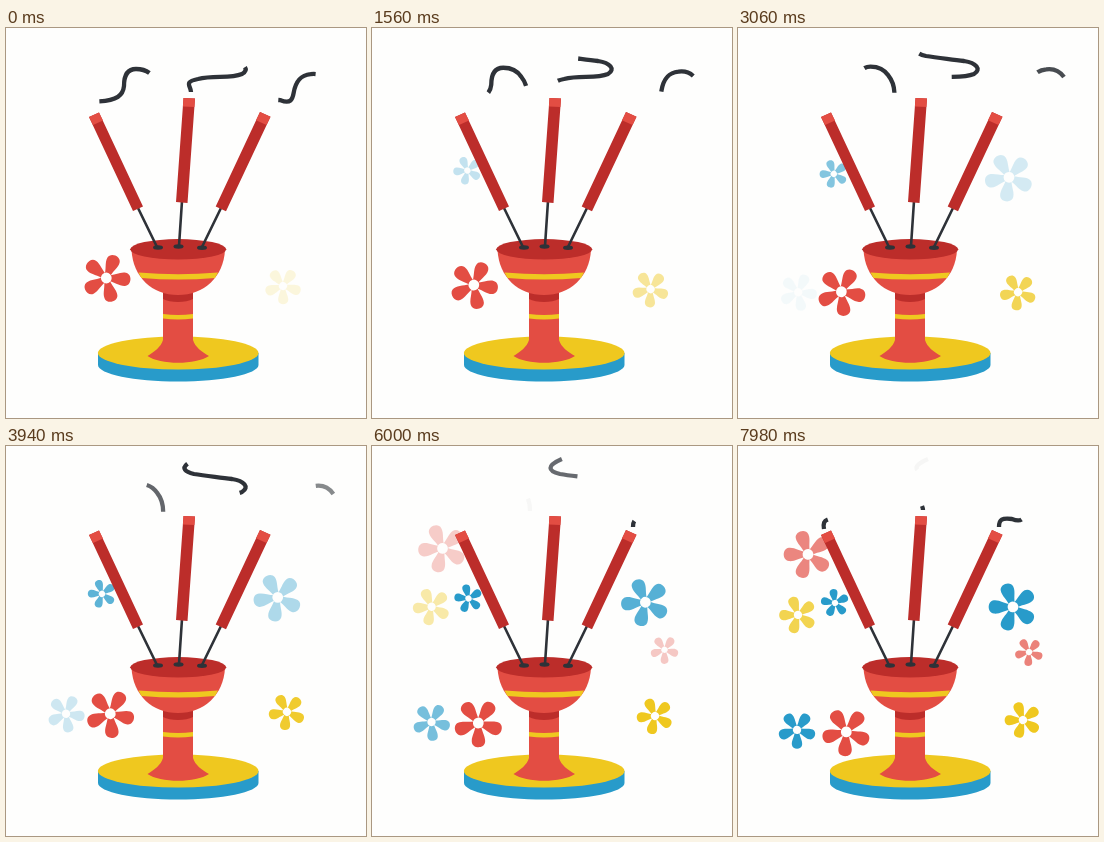
Animation of 360x390 px, one loop 8 s. Source, as an HTML page:

```html
<!DOCTYPE html>
<html lang="en">
<head>
<meta charset="utf-8">
<title>Incense</title>
<style>
  :root { --paper: #fefefd; --red: #e34d43; --crimson: #bc2d2a; --gold: #efc81f; --blue: #289bca; --ink: #2e3238; }
  html, body { margin: 0; width: 100%; height: 100%; overflow: hidden; background: var(--paper); }
  svg { display: block; width: 360px; height: 390px; }
  .red { fill: var(--red); }
  .crimson { fill: var(--crimson); }
  .gold { fill: var(--gold); }
  .blue { fill: var(--blue); }
  .ink { fill: var(--ink); }
  .paper { fill: var(--paper); }
  .line { fill: none; stroke: var(--ink); stroke-width: 2.6; }
  .smoke { fill: none; stroke: var(--ink); stroke-width: 4.3; }
</style>
</head>
<body>
<svg viewBox="0 0 360 390">
  <defs>
    <path id="petal" d="M-10 0C-12 -35 -30 -55 -27 -78C-24 -106 24 -106 27 -78C30 -55 12 -35 10 0Z"/>
  </defs>
  <g id="flowers"></g>

  <path class="blue" d="M92 325V337C92 346 128 353.5 172 353.5S252.500 346 252.500 337V325Z"/>
  <ellipse class="gold" cx="172.200" cy="325" rx="80.300" ry="16.500"/>
  <path class="red" d="M157 262H187V312C189 319 196 324 203 328C190 337 154 337 141.500 328C148 324 155 319 157 312Z"/>
  <path class="crimson" d="M157 262H187V271C180 275 164 275 157 271Z"/>
  <path class="gold" d="M157 286Q172 288 187 286V290.500Q172 292.500 157 290.500Z"/>
  <path class="red" d="M125.500 222C127 249 146 267 172 267S217.500 249 219 222Z"/>
  <path class="gold" d="M132.500 244.500Q172 248 212 244.500L209 250Q172 253 135.500 250Z"/>
  <ellipse class="crimson" cx="172.200" cy="221.300" rx="48" ry="10.200"/>

  <g class="ink">
    <ellipse cx="152" cy="219.500" rx="5" ry="2.200"/>
    <ellipse cx="172.500" cy="218.500" rx="5" ry="2.200"/>
    <ellipse cx="196" cy="219.700" rx="5" ry="2.200"/>
  </g>
  <path class="line" d="M132 180L151 219M176 173L173 218M215 180L196 219"/>
  <path class="crimson" d="M83 89L93 84.500L137 178.500L127 183ZM177.500 70L189 70.500L181.500 175L170 174ZM254 84L264.500 88.700L220 183.200L209.700 178.400Z"/>
  <path class="red" d="M83 89L93 84.500L97 92.500L87 97ZM177.500 70L189 70.500L188.400 79L176.900 78.400ZM254 84L264.500 88.700L260.500 97L250 92.300Z"/>

  <g id="smokes"></g>
</svg>
<script>
const LOOP = 8000;
const FADE_IN = 5000;
const TURN = 18; // degrees per loop

const clamp = (v) => Math.min(1, Math.max(0, v));
const smooth = (v) => v * v * (3 - 2 * v);
const $ = (id) => document.getElementById(id);

function add(parent, tag, attrs = {}) {
  const el = document.createElementNS('http://www.w3.org/2000/svg', tag);
  for (const key in attrs) el.setAttribute(key, attrs[key]);
  return parent.appendChild(el);
}

// Each part is a function that draws itself at time t.
const parts = [];

// A flower fades in from its birth while it drifts and turns at a steady pace.
function flower(color, radius, birth, [x, y], [dx, dy], angle) {
  const g = add($('flowers'), 'g', { class: color });
  for (let i = 0; i < 5; i++) {
    add(g, 'use', { href: '#petal', transform: `rotate(${i * 72})` });
  }
  add(g, 'circle', { r: 22, class: 'paper' });

  parts.push((t) => {
    const p = t / LOOP;
    g.setAttribute('opacity', clamp((t - birth) / FADE_IN));
    g.setAttribute('transform',
      `translate(${x + dx * p} ${y + dy * p}) rotate(${angle + TURN * p}) scale(${radius / 100})`);
  });
}

// A wisp grows along its path, is then eaten from the tail, rises and fades.
function smoke(d, births, [rx, ry]) {
  for (const birth of births) {
    const path = add($('smokes'), 'path', { d, pathLength: 100, class: 'smoke' });

    parts.push((t) => {
      const age = t - birth;
      const head = 100 * smooth(1 - (1 - clamp(age / 10800)) ** 1.3);
      const tail = 90 * smooth(clamp((age - 4200) / 8700));
      const rise = clamp((age - 6300) / 5000);
      path.setAttribute('stroke-dasharray', `0 ${tail} ${Math.max(0, head - tail)} 999`);
      path.setAttribute('opacity', clamp((12400 - age) / 2900));
      path.setAttribute('transform', `translate(${rx * rise} ${ry * rise})`);
    });
  }
}

flower('red', 24.5, -FADE_IN, [100.3, 250], [8, 36], 22);
flower('gold', 18.5, -700, [277, 258], [8, 16], 35);
flower('blue', 14.3, 200, [95, 139], [2, 18], 46);
flower('blue', 24.5, 2100, [268.5, 142], [6.5, 19], 36);
flower('blue', 19, 2850, [61, 252], [-2, 32], 18);
flower('gold', 19, 4100, [58.5, 136], [1.5, 33], 35);
flower('red', 14.3, 4500, [297, 197], [-6, 9], 22);
flower('red', 24.5, 4600, [72, 84], [-2, 24.5], 36);

smoke('M86 83C85 77 86 75 90 73.5C110 73 117 68 118 58C118 50 120 41 130 41C138 41 144 44 148 50C152 55 154 60 154 69',
  [-6300, 6300], [4, -4]);
smoke('M185 64C185 58 177 54 192 51C208 47 224 51 236 46C244 41 238 35 226 33C212 31 200 30 188 28C176 25 174 20 190 13',
  [-4300, 7150], [0, 0]);
smoke('M261 81C261 73 264 72 274 73C284 77 286 72 287 66C289 54 294 48 304 47C311 46 317 48 322 55',
  [-6800, 4600], [6, -8]);

function frame(now) {
  const t = now % LOOP;
  for (const draw of parts) draw(t);
  requestAnimationFrame(frame);
}
frame(0);
</script>
</body>
</html>
```
